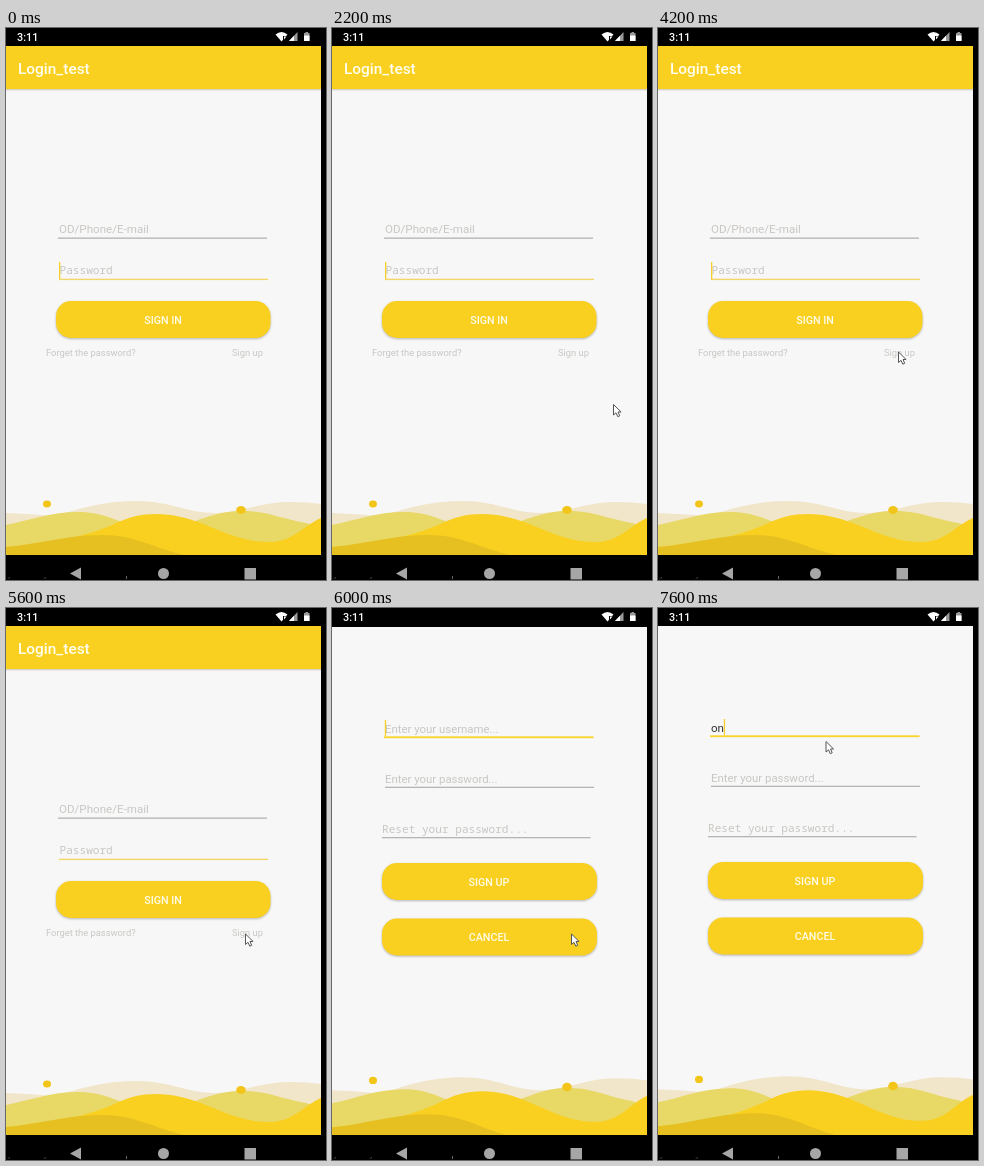
An HTML page that plays this animation: 320x552 px, repeating every 8000 ms.

```html
<!DOCTYPE html>
<html lang="en">
<head>
<meta charset="utf-8">
<title>Login screen</title>
<style>
  html, body { margin: 0; width: 100%; height: 100%; overflow: hidden; background: #000; }
  svg { display: block; width: 320px; height: 552px; font-family: Roboto, sans-serif; }
  .hint { font-size: 11.4px; fill: #c9c7c4; }
  .mono { font: 11.1px "Noto Sans Mono", "DejaVu Sans Mono", monospace; }
  .link { font-size: 9.35px; fill: #c9c7c4; }
  .label { font-size: 10.7px; font-weight: 500; fill: #fffbea; text-anchor: middle; }
  .button { fill: #f9d01f; filter: drop-shadow(0 1px 1px #0004); }
</style>
</head>
<body>
<svg viewBox="0 0 320 552">
  <defs>
    <clipPath id="content"><rect y="18" width="315" height="509"/></clipPath>
    <g id="waves">
      <path fill="#f1e6ca" d="M0 485Q25 486 50 488C85 476 110 473 130 473C165 473 180 485 210 485C240 483 255 474 285 474Q302 474 315 476V527H0Z"/>
      <path fill="#e8d866" d="M0 497C25 492 45 484 72 484C100 484 110 494 130 498L180 496C205 488 215 483 237 483C262 483 275 491 300 495L315 500V527H0Z"/>
      <path fill="#f9d01f" d="M0 527V519C50 515 80 508 106 497C122 489 135 486 150 486C195 486 220 514 263 514C288 514 298 497 315 490V527Z"/>
      <path fill="#e6c021" d="M0 519C35 516 60 507 97 507C130 507 150 521 178 527H0Z"/>
      <ellipse cx="41" cy="476" rx="4" ry="3.4" fill="#f2c518"/>
      <ellipse cx="235" cy="482" rx="4.8" ry="3.9" fill="#f2c518"/>
    </g>
  </defs>
  <rect width="320" height="552"/>
  <g clip-path="url(#content)">
    <g id="login">
      <rect y="18" width="315" height="509" fill="#f7f7f7"/>
      <rect y="61" width="315" height="1" fill="#d6d2c6"/>
      <rect y="62" width="315" height="1" fill="#ebeae6"/>
      <rect y="18" width="315" height="43" fill="#f9d01f"/>
      <text x="12" y="45.5" font-size="15.4" font-weight="500" fill="#fffdf0">Login_test</text>
      <text x="53" y="205" class="hint" style="font-size:11.6px">OD/Phone/E-mail</text>
      <rect x="52" y="209.5" width="209" height="1.3" fill="#b4b4b4"/>
      <text x="53.5" y="246" class="hint mono">Password</text>
      <rect x="53" y="250.7" width="209" height="1.4" fill="#f3d568"/>
      <rect x="50" y="273" width="214.5" height="37" rx="15" class="button"/>
      <text x="157" y="295.5" class="label">SIGN IN</text>
      <text x="40" y="328" class="link">Forget the password?</text>
      <text x="226" y="328" class="link">Sign up</text>
      <use href="#waves"/>
      <rect id="loginCaret" x="53" y="234" width="1.3" height="17" fill="#f5cf2c"/>
    </g>
    <g id="signup">
      <rect y="18" width="315" height="520" fill="#f7f7f7"/>
      <text id="nameHint" x="53" y="123.5" class="hint">Enter your username...</text>
      <text id="name" x="53" y="123.5" font-size="11.6" fill="#333"></text>
      <rect x="52" y="127.3" width="209.5" height="1.9" fill="#f9d62e"/>
      <text x="53" y="173.5" class="hint">Enter your password...</text>
      <rect x="53" y="177.7" width="209" height="1.3" fill="#b4b4b4"/>
      <text x="50" y="223.5" class="hint mono">Reset your password...</text>
      <rect x="50" y="228" width="208.5" height="1.3" fill="#b4b4b4"/>
      <rect x="50" y="254" width="215" height="37" rx="15" class="button"/>
      <text x="157" y="276.5" class="label">SIGN UP</text>
      <rect x="50" y="309.5" width="215" height="37" rx="15" class="button"/>
      <text x="157" y="332" class="label">CANCEL</text>
      <use href="#waves" transform="translate(0 527) scale(1 1.09) translate(0 -527)"/>
      <rect id="nameCaret" y="111" width="1.3" height="16" fill="#f5cf2c"/>
    </g>
  </g>
  <g fill="#fff">
    <text x="11" y="13" font-size="10.8" font-weight="500">3:11</text>
    <path d="M269.5 6.5Q275.5 1.5 281.5 6.5L275.5 13.5Z"/>
    <path d="M277 8h4v4h-4z" fill="#000"/>
    <path d="M278 8.5h2.5L278 11.5z"/>
    <path d="M283 13L291.500 4V13Z" fill="#999"/>
    <path d="M283 13L288 7.700V13Z"/>
    <path d="M298 5h1.500V4h2.500v1h1.500v8h-5.500z" fill="#999"/>
    <path d="M298 7.500h5.500V13h-5.500z"/>
  </g>
  <g fill="#a6a6a6">
    <path d="M64 545.5L75 539.500V551.500Z"/>
    <circle cx="157.500" cy="545.500" r="5.500"/>
    <rect x="238.500" y="540" width="11.500" height="11.500"/>
    <path d="M1 551l3-2v1zM37 551l3-2v1zM120 548h1v3h-1z" fill="#666"/>
  </g>
  <path id="pointer" d="M0 0V10.500L2.500 8.300L4.300 12.200L6.200 11.300L4.500 7.500H7.600Z" fill="#fff" stroke="#555" stroke-width="1"/>
</svg>
<script>
  const LOOP = 8000, STEP = 200;
  const loginBlink = [[0, 1], [200, 0], [800, 1], [1200, 0], [1800, 1], [2400, 0],
    [3000, 1], [3400, 0], [4000, 1], [4400, 0], [5000, 1], [5400, 0]];
  const nameBlink = [[0, 1], [6400, 0], [7000, 1]];
  const typed = [[0, ""], [7400, "o"], [7600, "on"]];
  const pageOffset = [[0, 0], [5800, 5], [6000, 1], [6200, 0]];
  const pointerPath = [[1800, 322, 430], [2600, 241, 323], [4200, 240.5, 324],
    [5600, 239.5, 326], [6200, 239.5, 326], [7200, 168, 133.500]];

  const el = id => document.getElementById(id);
  const show = (id, on) => el(id).style.display = on ? "" : "none";
  const valueAt = (steps, t) => steps.filter(s => s[0] <= t).pop()[1];

  function along(path, t) {
    const i = path.findIndex(p => p[0] > t);
    if (i === 0) return path[0].slice(1);
    if (i < 0) return path[path.length - 1].slice(1);
    const [t0, x0, y0] = path[i - 1], [t1, x1, y1] = path[i];
    const k = (t - t0) / (t1 - t0), e = k * k * (3 - 2 * k);
    return [x0 + (x1 - x0) * e, y0 + (y1 - y0) * e];
  }

  function draw(t) {
    show("login", t < 6000);
    show("signup", t >= 5800);
    show("loginCaret", valueAt(loginBlink, t));
    show("nameCaret", valueAt(nameBlink, t));
    el("signup").setAttribute("transform", `translate(0 ${valueAt(pageOffset, t)})`);

    const name = valueAt(typed, t);
    el("name").textContent = name;
    show("nameHint", !name);
    const width = name ? el("name").getComputedTextLength() : 0;
    el("nameCaret").setAttribute("x", 52.8 + width);

    show("pointer", t >= 2000);
    el("pointer").setAttribute("transform", `translate(${along(pointerPath, t)})`);
  }

  const start = performance.now();
  function tick() {
    const t = (performance.now() - start) % LOOP;
    draw(Math.floor(t / STEP) * STEP);
    requestAnimationFrame(tick);
  }
  tick();
</script>
</body>
</html>
```
